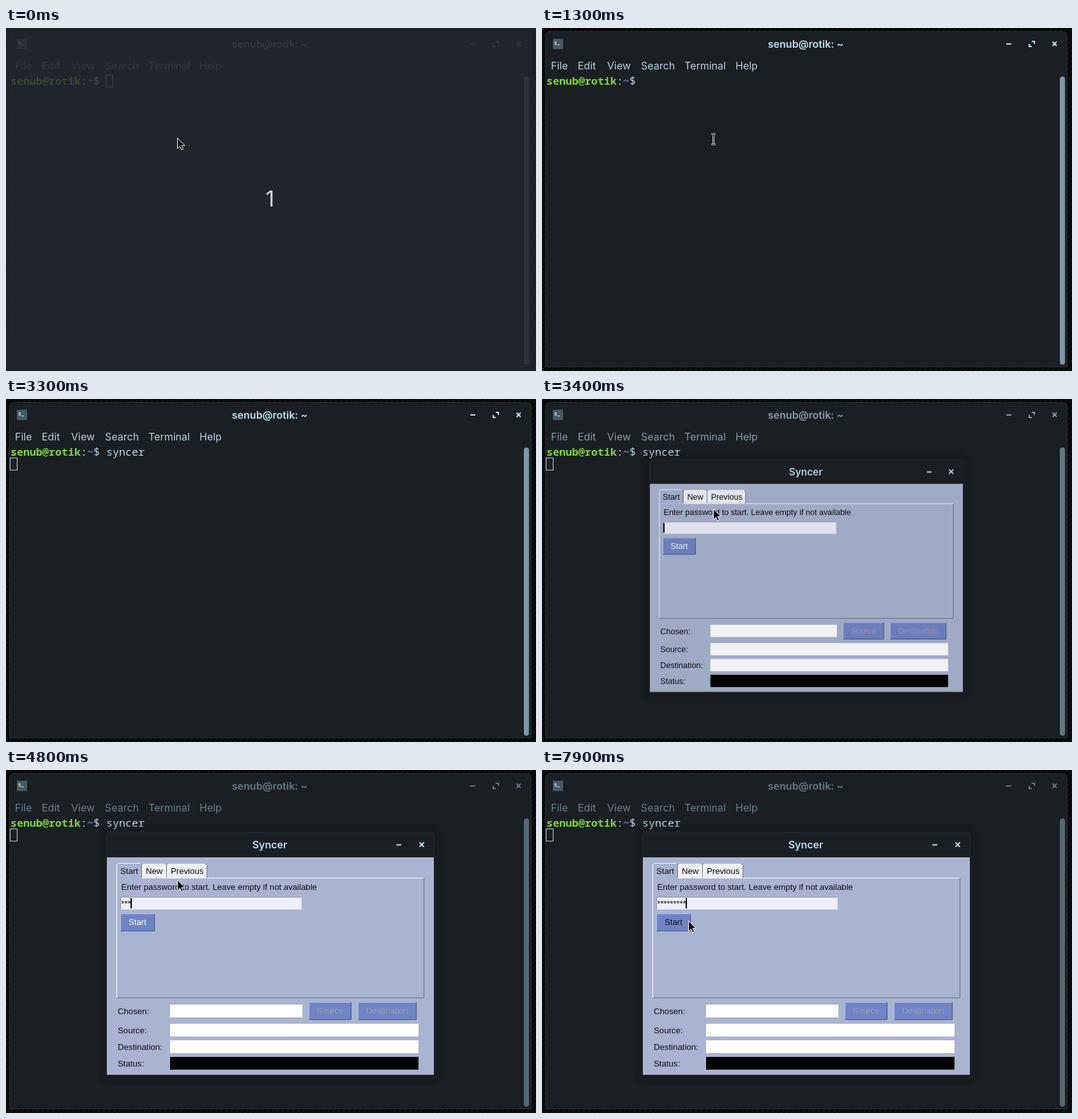
An HTML page that plays this animation: 830x538 px, repeating every 8000 ms.

```html
<!DOCTYPE html>
<html lang="en">
<head>
<meta charset="utf-8">
<title>Terminal</title>
<style>
html, body { margin: 0; width: 100%; height: 100%; overflow: hidden; background: #0a0a0b; }
svg { display: block; width: 830px; height: 538px; }
text { white-space: pre; }
.ui { font: 16px Inter, sans-serif; }
.title { font-weight: 600; text-anchor: middle; }
.mono { font: 16.667px "Roboto Mono", "Noto Sans Mono", monospace; fill: #b9d9e7; }
.host { font-weight: 700; fill: #7fd732; }
.path { font-weight: 700; fill: #6c8fbd; }
.tk { font: 13.2px "Liberation Sans", Arial, sans-serif; fill: #0c0c0e; }
.off { fill: #9c9fab; }
.line { fill: none; stroke-width: 2; }
</style>
</head>
<body>
<svg viewBox="0 0 830 538">
  <defs>
    <pattern id="weave" width="8" height="8" patternUnits="userSpaceOnUse">
      <rect width="8" height="8" fill="#09090a"/>
      <path d="M0 8L8 0M-2 2L2 -2M6 10L10 6" stroke="#19191a"/>
    </pattern>
  </defs>
  <rect width="830" height="538" fill="url(#weave)"/>

  <path d="M5.5 531.5V14Q5.5 5.5 14 5.5H814Q822.5 5.5 822.5 14V531.5Z" fill="#1a1f23" stroke="#2a3034"/>
  <rect x="17" y="17" width="16" height="16" fill="#465a64"/>
  <text x="19" y="26" style="font:700 7.5px 'Noto Sans Mono',monospace" fill="#dce8ee">$_</text>
  <g id="head" class="ui">
    <text class="title" x="413" y="31">senub@rotik: ~</text>
    <path class="line" d="M727 25H735M767 21H771V25M767 29H763V25M799.5 21.5L806 28M806 21.5L799.5 28"/>
  </g>
  <g id="menu" class="ui">
    <text x="14" y="65">File</text><text x="56" y="65">Edit</text>
    <text x="102" y="65">View</text><text x="155" y="65">Search</text>
    <text x="223" y="65">Terminal</text><text x="303" y="65">Help</text>
  </g>
  <rect id="bar" x="811" y="76" width="8" height="452" rx="4"/>
  <text class="mono" x="7" y="89"><tspan class="host">senub@rotik</tspan>:<tspan class="path">~</tspan>$ <tspan id="cmd"></tspan></text>
  <rect id="block" width="11" height="20" fill="#b9d9e7"/>
  <rect id="outline" width="11" height="19" fill="none" stroke="#b9d9e7"/>

  <g id="dialog">
    <rect x="144" y="86" width="540" height="408" rx="18" fill="#000" opacity=".1"/>
    <path d="M157.5 478.5V105Q157.5 97.5 165 97.5H663Q670.5 97.5 670.5 105V478.5Z" fill="#1a1f23" stroke="#23292d"/>
    <g class="ui" fill="#b9e0f1" stroke="none">
      <text class="title" x="413" y="123">Syncer</text>
      <path class="line" stroke="#b9e0f1" d="M611 117.500H619M647.500 113.500L654.500 120.500M654.500 113.500L647.500 120.500"/>
    </g>
    <rect x="158" y="137" width="512" height="341" fill="#a8b4d0"/>
    <g id="form"></g>
    <text id="stars" class="tk" x="180.500" y="214" style="font-size:12.85px"></text>
    <rect id="caret" y="201" width="2" height="16" fill="#000"/>
  </g>

  <g id="veil">
    <rect width="830" height="538" fill="#22262f" opacity=".8"/>
    <text class="ui" x="413.500" y="280" text-anchor="middle" style="font-size:34px" fill="#d6d9dc">1</text>
  </g>
  <path id="arrow" d="M.5 .5V17L4.300 13.500L6.800 19L9.500 17.800L7 12.300H12Z" fill="#0a0a0a" stroke="#fff"/>
  <g id="beam" fill="none">
    <path id="stem" d="M265.500 166.500H267.500L268.500 167.500L269.500 166.500H271.500M268.500 167V182M265.500 182.500H267.500L268.500 181.500L269.500 182.500H271.500" stroke="#fff" stroke-width="2.600"/>
    <path d="M266 166.500H271M268.500 167V182M266 182.500H271" stroke="#111"/>
  </g>
</svg>
<script>
const $ = id => document.getElementById(id);
const set = (id, attrs) => { for (const k in attrs) $(id).setAttribute(k, attrs[k]); };
const show = (id, on) => set(id, { visibility: on ? 'visible' : 'hidden' });

// Form widgets
const rect = (x, y, w, h, fill) => `<rect x="${x}" y="${y}" width="${w}" height="${h}" fill="${fill}"/>`;
const label = (x, y, s, extra = '') => `<text class="tk" x="${x}" y="${y}" ${extra}>${s}</text>`;
const bevel = (x, y, w, h, light, dark) =>
  `<path d="M${x + .5} ${y + h - .5}V${y + .5}H${x + w - .5}" fill="none" stroke="${light}"/>` +
  `<path d="M${x + .5} ${y + h - .5}H${x + w - .5}V${y + .5}" fill="none" stroke="${dark}"/>`;
const button = (x, y, w, s, extra) =>
  rect(x, y, w, 28, '#6e84c5') + bevel(x, y, w, 28, '#b4c1ea', '#465482') +
  `<text class="tk" x="${x + w / 2}" y="${y + 18}" text-anchor="middle" ${extra}>${s}</text>`;
const tab = (x, y, w, s, fill) =>
  `<path d="M${x + .5} 169V${y + 2.5}L${x + 2.5} ${y + .5}H${x + w - 2}" fill="${fill}" stroke="#fff"/>` +
  `<path d="M${x + w - 2.5} ${y + .5}L${x + w - .5} ${y + 2.5}V169H${x + 1}" fill="${fill}"/>` +
  `<path d="M${x + w - 2.5} ${y + .5}L${x + w - .5} ${y + 2.5}V169" fill="none" stroke="#6b7284"/>` +
  label(x + 6, 163, s);
$('form').innerHTML =
  bevel(173, 169, 482, 189, '#fff', '#666d80') +
  tab(213, 147, 39, 'New', '#f0f2f9') + tab(252, 147, 63, 'Previous', '#f0f2f9') +
  tab(173, 146, 40, 'Start', '#a8b4d0') + rect(174, 169, 38, 1, '#a8b4d0') +
  label(180.5, 188, 'Enter password to start. Leave empty if not available') +
  rect(179, 199, 284, 20, '#eceffa') + bevel(179, 199, 284, 20, '#8a92a6', '#dce1ee') +
  button(179, 225, 54, 'Start', 'id="start"') +
  label(175, 383, 'Chosen:') + rect(257, 368, 207, 20, '#fff') +
  button(474, 364, 67, 'Source', 'style="fill:#9c9fab"') +
  button(551, 364, 92, 'Destination', 'style="fill:#9c9fab"') +
  label(175, 413, 'Source:') + rect(257, 398, 389, 20, '#fff') +
  label(175, 439, 'Destination:') + rect(257, 424, 389, 20, '#fff') +
  label(175, 465, 'Status:') + rect(257, 450, 389, 20, '#000');

const LOOP = 8000;
const typed = [1500, 1600, 1800, 1900, 2100, 2400];
const secret = [4400, 4600, 4800, 5100, 5100, 6300, 6300, 6500, 6900];
const focus = [[0, 0], [800, .35], [900, .8], [1000, 1], [3400, .35], [3500, .06], [3600, 0]];
const mouse = [[0, 268, 172], [7400, 276, 173], [7500, 285, 174], [7700, 265, 199], [7800, 242, 226], [7900, 229, 236]];
const count = (times, t) => times.filter(k => t >= k).length;
const at = (keys, t) => keys.filter(k => t >= k[0]).pop();
const between = (t, a, b) => t >= a && t < b;
const mix = (a, b, p) => `rgb(${a.map((v, i) => Math.round(v + (b[i] - v) * p))})`;

function draw(t) {
  const [, f] = at(focus, t);
  const head = mix([98, 122, 134], [190, 228, 243], f);
  set('head', { fill: head, stroke: 'none' });
  $('head').querySelector('path').setAttribute('stroke', head);
  set('menu', { fill: mix([104, 128, 140], [182, 211, 223], f) });
  set('bar', { fill: mix([83, 105, 116], [122, 151, 165], f) });

  const n = count(typed, t);
  $('cmd').textContent = 'syncer'.slice(0, n);
  const x = t < 2900 ? 157 + 10 * n : 7, y = t < 2900 ? 74 : 93;
  const solid = between(t, 800, 3300);
  set('block', { x, y });
  set('outline', { x: x - .5, y: y - .5 });
  show('block', solid && !between(t, 1300, 1500));
  show('outline', !solid);

  const m = count(secret, t);
  show('dialog', t >= 3400);
  set('dialog', t < 3500
    ? { opacity: .94, transform: 'matrix(.957 0 0 .957 17.8 2)' }
    : { opacity: 1, transform: '' });
  $('stars').textContent = '*'.repeat(m);
  set('caret', { x: 180 + 5 * m });
  const blink = between(t, 5700, 6000) || between(t, 6600, 7400);
  $('caret').style.display = blink ? 'none' : '';
  $('start').style.fill = t >= 7900 ? '#0c0c0e' : '#fff';

  show('veil', t < 100);
  show('beam', between(t, 100, 1500));
  show('arrow', t < 100 || t >= 3400);
  const [, mx, my] = at(mouse, t);
  set('arrow', { transform: `translate(${mx} ${my})` });
}

const begin = performance.now();
(function tick() {
  draw((performance.now() - begin) % LOOP);
  requestAnimationFrame(tick);
})();
</script>
</body>
</html>
```
